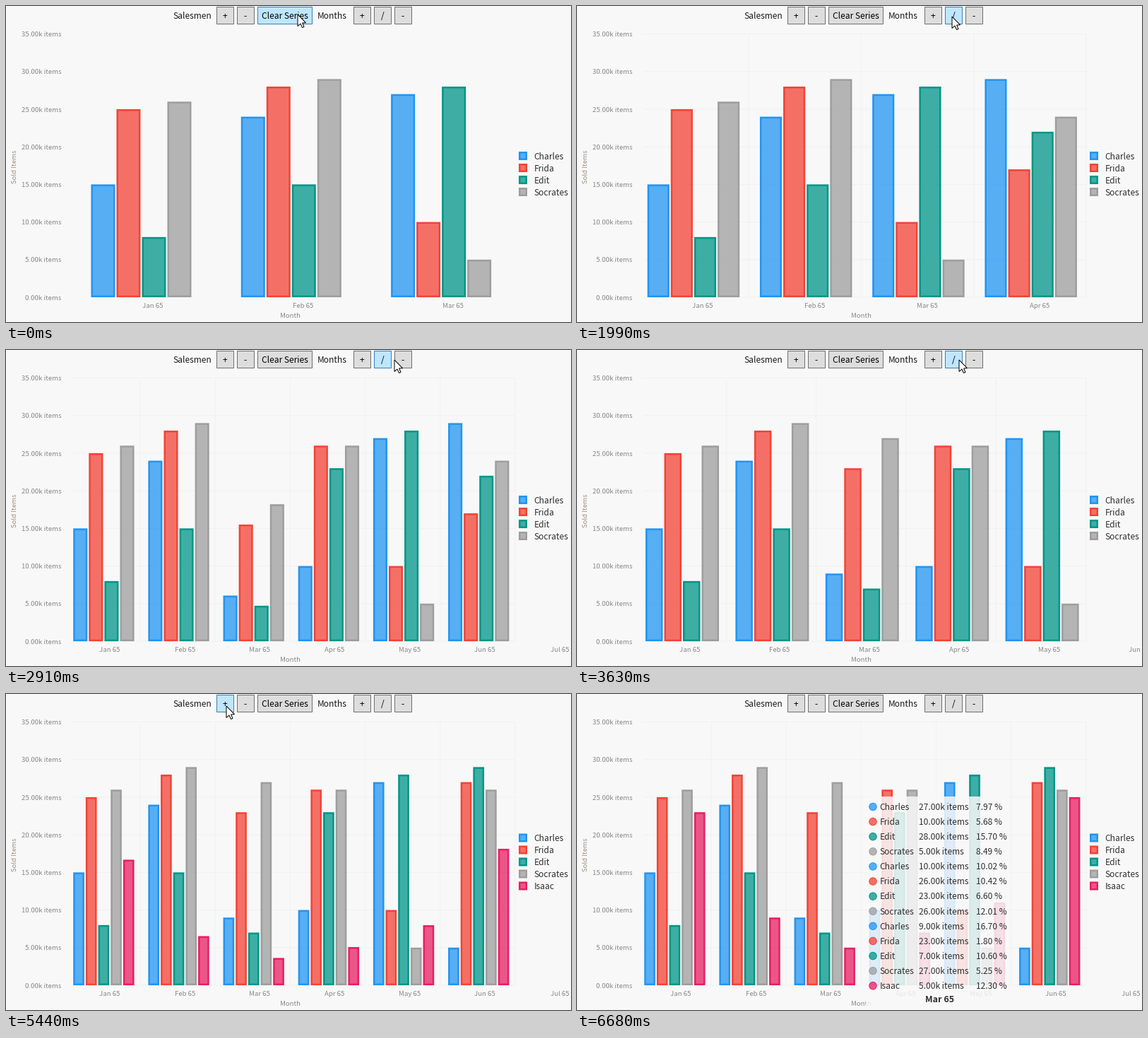
A matplotlib script for the animation above (6780 ms loop, 800x447 px).

```python
import random

import numpy as np
import matplotlib.pyplot as plt
from matplotlib.animation import FuncAnimation
from matplotlib.collections import PolyCollection
from matplotlib.colors import to_rgba
from matplotlib.patches import Circle, Polygon, Rectangle
from matplotlib.transforms import Affine2D

W, H, DPI = 800, 447, 100
LOOP, STEP = 6780, 30
PT = 72 / DPI
BG = "#f8f8f8"
LEFT, RIGHT, TOP, BOTTOM = 84, 721, 39.5, 412
PER_K = (BOTTOM - TOP) / 35
STROKE = 2.5
GROW = 430

plt.rcParams["font.family"] = ["Noto Sans CJK JP", "DejaVu Sans"]
plt.rcParams["toolbar"] = "None"

NAMES = ["Charles", "Frida", "Edit", "Socrates", "Isaac"]
COLORS = ["#2195f2", "#f34336", "#009688", "#9e9e9e", "#e91e63"]
MONTHS = ["Jan", "Feb", "Mar", "Apr", "May", "Jun", "Jul"]

# items sold per salesman, in thousands
FIRST = [(15, 25, 8, 26, 23), (24, 28, 15, 29, 9), (27, 10, 28, 5, 11)]
APPENDED = (29, 17, 22, 24)
INSERTED = (10, 26, 23, 26, 7)
INSERTED_2 = (9, 23, 7, 27, 5)
APPENDED_2 = (5, 27, 29, 26, 25)

# time, position, values (no values: the month is removed)
EDITS = [(760, 3, APPENDED), (2050, 2, INSERTED), (2630, 2, INSERTED_2),
         (3540, 5, None), (4362, 5, APPENDED_2)]
FIFTH_SHOWN, FIFTH_START = 5180, 5128

# pointer: first place, then moves as (start, end, x, y)
HOME = (413, 12)
MOVES = [(30, 690, 497, 15), (760, 1060, 493, 24), (1410, 1980, 531, 15),
         (2630, 3080, 560, 14), (3540, 3820, 506, 14),
         (4100, 4620, 312, 17), (5500, 6010, 400, 210)]
TIP_SHOWN, TIP_SETTLED, TIP_SHIFT = 5840, 6010, -290

fig = plt.figure(figsize=(W / DPI, H / DPI), dpi=DPI, facecolor=BG)
ax = fig.add_axes([0, 0, 1, 1])
ax.set_xlim(0, W)
ax.set_ylim(H, 0)
ax.axis("off")


def text(x, y, s, px=12, color="#1c1c1c", ha="left", **kw):
    kw.setdefault("va", "baseline")
    return ax.text(x, y, s, fontsize=px * PT, color=color, ha=ha, **kw)


def box(x0, y0, x1, y1):
    return [(x0, y0), (x1, y0), (x1, y1), (x0, y1)]


def framed(x0, y0, x1, y1):
    """Box whose stroke stays inside the given edges."""
    d = STROKE / 2
    return box(x0 + d, min(y0, y1 - STROKE) + d, x1 - d, y1 - d)


def ramp(t, start, length):
    return float(np.clip((t - start) / length, 0, 1))


# axes
AXIS = dict(px=9.6, color="#888888")
for k in range(0, 36, 5):
    text(78.5, BOTTOM - k * PER_K + 3.6, f"{k}.00k items", ha="right", **AXIS)
text(402.5, 441, "Month", ha="center", **AXIS)
text(12.5, 227, "Sold Items", px=9.6, color="#a08f80", ha="center",
     va="center", rotation=90)
month_labels = [text(0, 427, f"{m} 65", ha="center", **AXIS) for m in MONTHS]
rows = [box(94, y, RIGHT, y) for y in TOP + 5 * PER_K * np.arange(8)]
grid = PolyCollection([], facecolors="none", edgecolors="#f1f1f1",
                      linewidths=PT, zorder=1, snap=False)
ax.add_collection(grid)

# bars and legend keys
bars = PolyCollection([], linewidths=STROKE * PT, joinstyle="miter", zorder=2,
                      snap=False)
ax.add_collection(bars)
legend = [text(747.5, 0, name, color="#303030") for name in NAMES]

# buttons
buttons = []
for title, title_x, x, captions in (("Salesmen", 236, 298, ["+", "-", "Clear Series"]),
                                    ("Months", 441, 492, ["+", "/", "-"])):
    text(title_x, 18, title)
    for caption in captions:
        w = 25 if len(caption) == 1 else 78
        face = Rectangle((x + .5, 1.5), w - 1, 24, lw=PT, zorder=2, snap=False)
        buttons.append((ax.add_patch(face), x, w))
        text(x + w / 2 - .5, 18, caption, color="black", ha="center", zorder=4)
        x += w + 4

# tooltip
shift = Affine2D()
tip_tf = shift + ax.transData
TIP = dict(zorder=7, transform=tip_tf)
tip = [ax.add_patch(Rectangle((409, 145), 205, 302, color=BG, alpha=.85, lw=0,
                              zorder=6, transform=tip_tf))]
rng = random.Random(65)
entries = [(s, m[s]) for m in (FIRST[2], INSERTED, INSERTED_2) for s in range(4)]
entries.append((4, INSERTED_2[4]))
for i, (s, value) in enumerate(entries):
    y = 159.5 + 21.1 * i
    tip.append(ax.add_patch(Circle((419, y), 5.2, fc=to_rgba(COLORS[s], .75),
                                   ec=COLORS[s], lw=PT, **TIP)))
    cells = (NAMES[s], f"{value}.00k items", f"{rng.uniform(.5, 18.5):.2f} %")
    for x, cell in zip((428.5, 484, 565), cells):
        tip.append(text(x, y + 4.3, cell, color="#303030", **TIP))
tip.append(text(513.5, 436, "Mar 65", px=12.5, color="#303030", ha="center",
                weight="bold", **TIP))

# pointer
ARROW = np.array([(0, 0), (0, 16.5), (4, 13), (6.5, 18.5), (9, 17.5),
                  (6.6, 12), (11.5, 11.7)])
arrow = ax.add_patch(Polygon(ARROW, fc="white", ec="black", lw=PT, zorder=9))


def months_at(t):
    """Visible months as (values, start of growth)."""
    months = [(values, -GROW) for values in FIRST]
    for when, pos, values in EDITS:
        if t >= when:
            if values:
                months.insert(pos, (values, when))
            else:
                months.pop(pos)
    return months


def draw_chart(t):
    months = months_at(t)
    series = 5 if t >= FIFTH_SHOWN else 4
    unit = (RIGHT - LEFT) / len(months)
    pitch = min(36, .832 * unit / series)
    verts, colors = [], []
    for i, (values, start) in enumerate(months):
        x0 = LEFT + unit * (i + .5) + 1.3 - (series * pitch - 2) / 2
        for s in range(series):
            p = ramp(t, FIFTH_START if s == 4 else start, GROW)
            x = x0 + s * pitch
            verts.append(framed(x, BOTTOM - values[s] * PER_K * p,
                                x + pitch - 2, BOTTOM))
            colors.append(COLORS[s])
    for s, label in enumerate(legend):
        y = 238 + (s - (series - 1) / 2) * 17
        label.set_visible(s < series)
        label.set_y(y + 4.2)
        if s < series:
            verts.append(framed(726, y - 6.5, 738, y + 5.5))
            colors.append(COLORS[s])
    bars.set_verts(verts)
    bars.set_facecolor([to_rgba(c, .75) for c in colors])
    bars.set_edgecolor(colors)
    for i, label in enumerate(month_labels):
        label.set_x(86 + unit * (i + .575))
        label.set_visible(i <= len(months))
    columns = [box(x, TOP, x, BOTTOM)
               for x in LEFT + unit * np.arange(1, len(months) + 1)]
    grid.set_verts(rows + columns)
    grid.set_visible(t >= EDITS[0][0])


def draw_pointer(t):
    tip_at = np.array(HOME, float)
    for start, end, *goal in MOVES:
        tip_at += (np.array(goal) - tip_at) * ramp(t, start, end - start)
    x, y = tip_at
    arrow.set_xy(ARROW + np.round(tip_at))
    arrow.set_visible(t < TIP_SETTLED)
    for face, left, width in buttons:
        hot = left <= x < left + width + 4 and y < 26
        face.set_facecolor("#bee6fd" if hot else "#dddddd")
        face.set_edgecolor("#3c7fb1" if hot else "#707070")


def draw_tip(t):
    for part in tip:
        part.set_visible(t >= TIP_SHOWN)
    p = ramp(t, TIP_SHOWN + 20, TIP_SETTLED - TIP_SHOWN - 20)
    shift.clear().translate(round(TIP_SHIFT * (1 - p)), 0)


def draw(k):
    t = k * STEP + 10
    draw_chart(t)
    draw_pointer(t)
    draw_tip(t)
    return []


anim = FuncAnimation(fig, draw, frames=LOOP // STEP, interval=STEP,
                     repeat=True, repeat_delay=0, blit=False)
plt.show()
```
